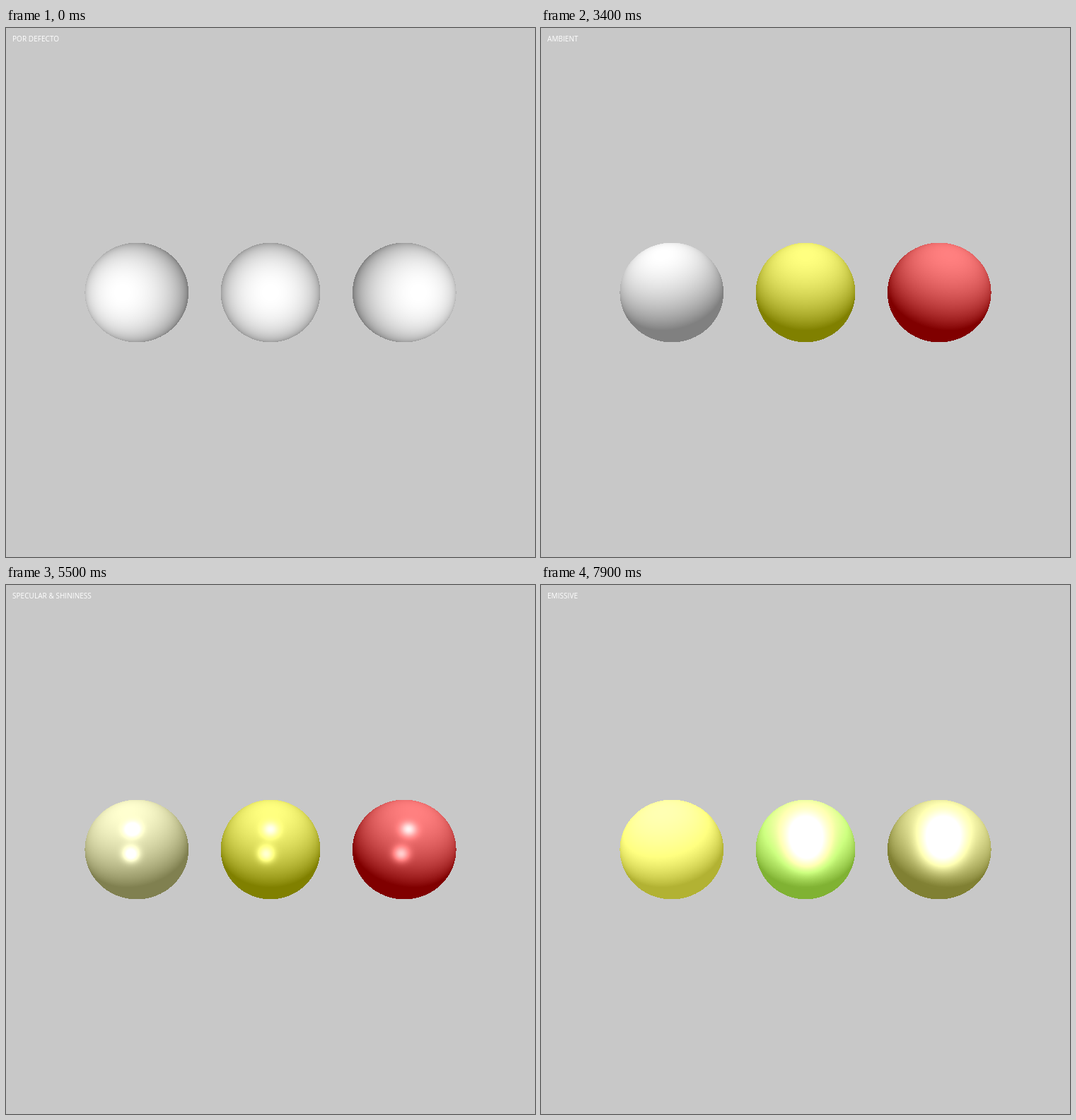
An HTML page with a canvas that plays this animation: 748 by 748 pixels, repeating every 8 s.

```html
<!DOCTYPE html>
<html lang="es">
<head>
<meta charset="utf-8">
<title>Materiales</title>
<style>
  html, body { margin: 0; width: 100%; height: 100%; overflow: hidden; background: #c8c8c8; }
  canvas { position: absolute; left: 0; top: 0; }
  #label {
    position: absolute; left: 9px; top: 8px;
    font: 10px/14px "Open Sans", "Noto Sans", sans-serif;
    letter-spacing: 0.05px; color: #fff; white-space: pre;
  }
</style>
</head>
<body>
<canvas id="stage" width="748" height="748"></canvas>
<div id="label"></div>
<script>
const SIZE = 748, MID = SIZE / 2, LOOP = 8000, STEP = 100;
const EYE = MID / Math.tan(Math.PI / 6);
const RADIUS = 70, REACH = 80, CENTERS = [-187, 0, 187];
const POWER = 128;
const FRONT = [0, 0, 1], ABOVE = [0, -Math.SQRT1_2, Math.SQRT1_2];

// base: unlit colour of each sphere; gloss: whether it shows highlights
const MODES = [
  { from: 0, label: 'POR DEFECTO', sun: FRONT, gloss: [0, 0, 0],
    base: [[128, 128, 128], [128, 128, 128], [128, 128, 128]] },
  { from: 1200, label: 'AMBIENT', sun: ABOVE, gloss: [0, 0, 0],
    base: [[128, 128, 128], [128, 128, 0], [128, 0, 0]] },
  { from: 3500, label: 'SPECULAR & SHININESS', sun: ABOVE, gloss: [1, 1, 1],
    base: [[128, 128, 80], [128, 128, 0], [128, 0, 0]] },
  { from: 5800, label: 'EMISSIVE', sun: ABOVE, gloss: [0, 1, 1],
    base: [[178, 178, 51], [128, 178, 51], [128, 128, 51]] }
];

// time, lamp x, lamp y, shininess
const LAMP = [
  [3500, -40, 60, 60], [4200, -180, -180, 45], [4700, 90, -340, 8],
  [5500, -165, 180, 87], [6700, 105, 180, 80], [7900, 60, 30, 12], [8000, 50, 20, 11]
];
const LAMP_Z = 1000;

const dot = (a, b) => a[0] * b[0] + a[1] * b[1] + a[2] * b[2];
const sub = (a, b) => [a[0] - b[0], a[1] - b[1], a[2] - b[2]];
const add = (a, b) => [a[0] + b[0], a[1] + b[1], a[2] + b[2]];
const scale = (a, k) => [a[0] * k, a[1] * k, a[2] * k];
const unit = a => scale(a, 1 / Math.sqrt(dot(a, a)));

const ctx = document.getElementById('stage').getContext('2d');
const label = document.getElementById('label');

// Surface point, normal and view direction behind each pixel of a sphere
function project(cx) {
  const pixels = [], size = REACH * 2;
  const left = MID + cx - REACH, top = MID - REACH;
  const eye = [0, 0, EYE], center = [cx, 0, 0], origin = sub(eye, center);
  for (let y = 0; y < size; y++) {
    for (let x = 0; x < size; x++) {
      const ray = unit([left + x + 0.5 - MID, top + y + 0.5 - MID, -EYE]);
      const b = dot(origin, ray);
      const disc = b * b - dot(origin, origin) + RADIUS * RADIUS;
      if (disc < 0) continue;
      const point = add(eye, scale(ray, -b - Math.sqrt(disc)));
      const normal = scale(sub(point, center), 1 / RADIUS);
      pixels.push({ at: (y * size + x) * 4, point, normal, view: scale(ray, -1) });
    }
  }
  return { left, top, pixels, image: ctx.createImageData(size, size) };
}
const spheres = CENTERS.map(project);

function lampAt(t) {
  if (t <= LAMP[0][0]) return LAMP[0].slice(1);
  const i = LAMP.findIndex(k => k[0] >= t);
  const [t0, x0, y0, n0] = LAMP[i - 1], [t1, x1, y1, n1] = LAMP[i];
  const e = (1 - Math.cos(Math.PI * (t - t0) / (t1 - t0))) / 2;
  return [x0 + (x1 - x0) * e, y0 + (y1 - y0) * e, n0 * Math.pow(n1 / n0, e)];
}

function highlight(p, dir, shine) {
  return Math.pow(Math.max(0, dot(p.normal, unit(add(dir, p.view)))), shine);
}

function shade(sphere, base, gloss, sun, lamp, shine) {
  const data = sphere.image.data;
  for (const p of sphere.pixels) {
    let light = Math.max(0, dot(p.normal, sun));
    if (gloss) {
      light += highlight(p, sun, shine) + highlight(p, unit(sub(lamp, p.point)), shine);
    }
    for (let k = 0; k < 3; k++) data[p.at + k] = base[k] + POWER * light;
    data[p.at + 3] = 255;
  }
  ctx.putImageData(sphere.image, sphere.left, sphere.top);
}

function draw(t) {
  const mode = MODES.filter(m => m.from <= t).pop();
  const [x, y, shine] = lampAt(t);
  label.textContent = mode.label;
  spheres.forEach((s, i) =>
    shade(s, mode.base[i], mode.gloss[i], mode.sun, [x, y, LAMP_Z], shine));
}

const start = performance.now();
let shown = -1;
function tick() {
  const t = Math.floor((performance.now() - start) % LOOP / STEP) * STEP;
  if (t !== shown) draw(shown = t);
  requestAnimationFrame(tick);
}
tick();
</script>
</body>
</html>
```
